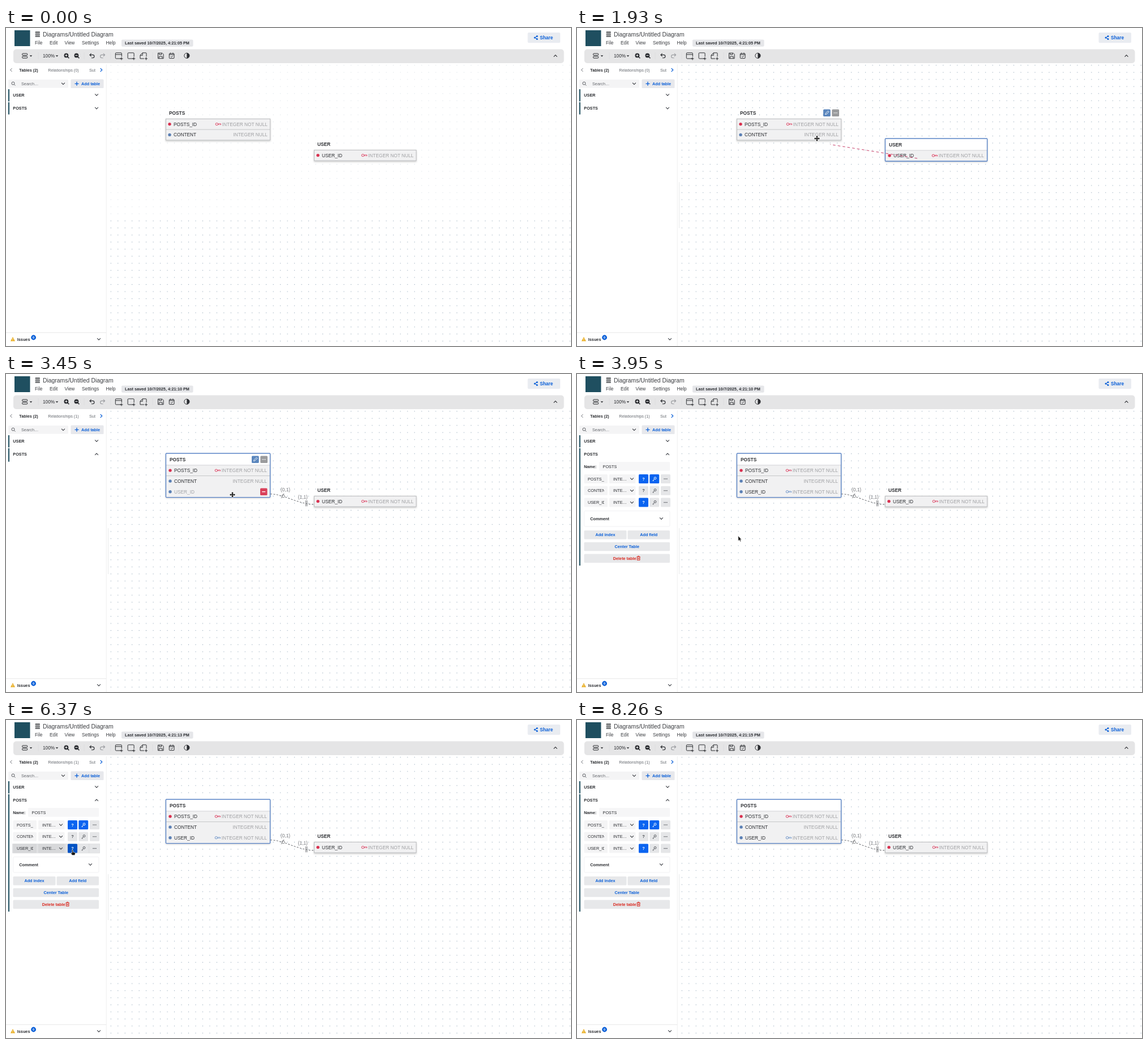
An HTML page for the animation above (9.44 s loop, 998 px wide and 561 px high).

```html
<!DOCTYPE html>
<html lang="en">
<head>
<meta charset="utf-8">
<title>Diagram editor</title>
<style>
html, body { margin: 0; width: 100%; height: 100%; overflow: hidden; background: #fff; }
svg { display: block; font-family: "Liberation Sans", Arial, sans-serif; }
text { white-space: pre; }
</style>
</head>
<body>
<svg id="stage" width="998" height="561" viewBox="0 0 998 561">
  <defs>
    <pattern id="grid" x="191.5" y="334" width="12.475" height="12.475" patternUnits="userSpaceOnUse">
      <circle cx="6.24" cy="6.24" r=".62" fill="#8fa3b5"/>
    </pattern>
    <clipPath id="nameClip"><rect x="12" y="170" width="36" height="70"/></clipPath>
    <clipPath id="tabClip"><rect x="140" y="64" width="18" height="20"/></clipPath>
    <clipPath id="panelClip"><rect id="panelBox" x="0" y="152" width="177" height="0"/></clipPath>
    <filter id="shadow" x="-10%" y="-30%" width="120%" height="180%">
      <feDropShadow dx="0" dy="1.5" stdDeviation="1.5" flood-color="#000" flood-opacity=".22"/>
    </filter>
  </defs>
  <g id="back"></g>
  <g id="live"></g>
  <g id="panel" clip-path="url(#panelClip)"></g>
  <g id="cursor"></g>
</svg>
<script>
const LOOP = 9440;
const INK = '#2b2d31', BLUE = '#0a5fd8', PINK = '#d9304f', STEEL = '#5b80b5', TEAL = '#1f4f60';
const $ = id => document.getElementById(id);

const rect = (x, y, x2, y2, fill, r = 0, more = '') =>
  `<rect x="${x}" y="${y}" width="${x2 - x}" height="${y2 - y}" rx="${r}" fill="${fill}" ${more}/>`;
const line = (d, color = INK, w = 1, more = '') =>
  `<path d="${d}" fill="none" stroke="${color}" stroke-width="${w}" ${more}/>`;
const area = (d, fill) => `<path d="${d}" fill="${fill}"/>`;
const disc = (x, y, r, fill, more = '') => `<circle cx="${x}" cy="${y}" r="${r}" fill="${fill}" ${more}/>`;
const small = 7.28, normal = 8.32;
// y is the middle of the capital letters
const text = (x, y, s, size = small, fill = INK, more = '') =>
  `<text x="${x}" y="${y + size * .36}" font-size="${size}" fill="${fill}" ${more}>${s}</text>`;
const bold = (x, y, s, size = small, fill = INK, more = '') =>
  text(x, y, s, size, fill, 'font-weight="700" ' + more);
const MID = 'text-anchor="middle"', END = 'text-anchor="end"', ROUND = 'stroke-linecap="round" stroke-linejoin="round"';
const chevron = (x, y, dir = 1, color = '#44474d') =>
  line(`M${x - 2.6} ${y - 1.3 * dir}L${x} ${y + 1.4 * dir}L${x + 2.6} ${y - 1.3 * dir}`, color, 1.1, ROUND);
const sideways = (x, y, dir, color) =>
  line(`M${x - 1.3 * dir} ${y - 2.6}L${x + 1.4 * dir} ${y}L${x - 1.3 * dir} ${y + 2.6}`, color, 1.3, ROUND);
const ellipsis = (x, y, color) => [-2.4, 0, 2.4].map(d => disc(x + d, y, .8, color)).join('');
const caret = x => area(`M${x - 2.3} 48.2h4.6l-2.3 2.6z`, INK);

function toolbar() {
  const zoom = (x, d) => disc(x - .6, 48.4, 3.9, INK) + line(`M${x + 2} 51l2.4 2.4`, INK, 1.5) + line(d, '#fff', 1);
  const plus = x => line(`M${x} 54h5M${x + 2.5} 51.5v5`, INK, 1);
  const frame = x => line(`M${x + 5.5} 54H${x - 4}q-1.2 0-1.2-1.2V45q0-1.2 1.2-1.2h8.6q1.2 0 1.2 1.2v5.5`, INK, 1);
  const turn = (x, d, c) => line(`M${x - 4 * d} 47.4h5.2a2.6 2.6 0 0 ${d > 0 ? 1 : 0} 0 5.4h-2.4`
    .replace('h5.2', `h${5.2 * d}`).replace('h-2.4', `h${-2.4 * d}`), c, 1.1) +
    line(`M${x - 1.4 * d} 44.8l${-2.7 * d} 2.6l${2.7 * d} 2.6`, c, 1.1);
  return rect(13, 37.5, 985.5, 62, '#e5e5e6', 5) +
    [57, 98, 138, 185, 259, 305].map(x => line(`M${x} 43v12`, '#dadadb', .7)).join('') +
    rect(28.7, 45, 37.7, 48.2, 'none', 1, `stroke="${INK}"`) + rect(28.7, 50, 37.7, 53.2, 'none', 1, `stroke="${INK}"`) +
    caret(44) + text(65, 49, '100%', normal) + caret(90) +
    zoom(107, 'M104.4 48.4h4M106.4 46.4v4') + zoom(125, 'M122.4 48.4h4') +
    turn(152, 1, INK) + turn(170.5, -1, '#9b9da1') +
    frame(198.5) + line('M193.4 46.8h11', INK, 1) + plus(201.5) +
    frame(220.3) + plus(223.3) +
    line('M244 54h-7v-6l4-4.2h6q1 0 1 1v5.5M237 48.2h4.2v-4.2', INK, 1) + plus(245) +
    line('M268.5 44.2h7.4l2.2 2.2v7.4h-9.6zM270.4 53.8v-3.6h5.6v3.6M270.6 44.2v2.8h4v-2.8', INK, 1) +
    rect(288.3, 45, 297, 53.6, 'none', 1, `stroke="${INK}"`) +
    line('M288.3 47h8.7M290.4 43.6v2M294.9 43.6v2M290.8 50.2l1.4 1.4 2.6-2.7', INK, 1) +
    disc(319.4, 48.8, 4.6, 'none', `stroke="${INK}" stroke-width="1"`) + area('M319.4 44.2a4.6 4.6 0 0 1 0 9.2z', INK) +
    chevron(970.5, 49, -1, INK);
}

function chrome() {
  const menu = [['File', 51], ['Edit', 77], ['View', 103.5], ['Settings', 134], ['Help', 176.5]];
  return rect(15, 4, 42.5, 32, TEAL) +
    [6.5, 10, 13.5].map(y => rect(51.5, y - .5, 60, y + 2.6, '#7c7e80', 1.2)).join('') +
    text(65, 11, 'Diagrams/Untitled Diagram', 10.4, '#3c3e42') +
    menu.map(([s, x]) => text(x, 26.5, s, normal, '#3c3e42')).join('') +
    rect(204, 20.5, 330.5, 32.7, '#e5e6e9', 2) +
    rect(921.5, 8, 979, 26.3, '#e9ecf1', 2) + bold(943, 17, 'Share', normal, BLUE) +
    line('M938 14.6L934 17l4 2.4', BLUE, 1) + disc(938, 14.4, 1.5, BLUE) + disc(934, 17, 1.5, BLUE) + disc(938, 19.6, 1.5, BLUE) +
    toolbar() +
    line('M177.2 64V561', '#ebebed', .8) +
    sideways(9, 74, -1, '#a9abaf') + bold(23.3, 74, 'Tables (2)') +
    text(147, 74, 'Subject', small, '#666a70', 'clip-path="url(#tabClip)"') + sideways(168.3, 74, 1, BLUE) +
    rect(4, 91, 110, 105.5, '#f4f4f5', 1.5) + disc(12.5, 97.6, 2.5, 'none', 'stroke="#55585e"') +
    line('M14.4 99.5l2 2', '#55585e', 1) + text(27, 98.3, 'Search…', small, '#66696f') + chevron(101, 98.3) +
    rect(114.5, 90.5, 172.5, 106, '#e7e8ec', 1.5) + line('M121.5 98.3h7M125 94.8v7', BLUE, 1.3) +
    bold(133, 98.3, 'Add table', small, BLUE) +
    rect(4, 108, 6, 129.5, TEAL) + bold(12.3, 118, 'USER') + chevron(160, 118) + bold(12.3, 141.4, 'POSTS') +
    line('M0 537.5H177', '#e2e2e4', .8) +
    area('M12 545l4 7.4h-8z', '#e9ae22') + line('M12 547.5v2.3M12 550.5v1', '#fff', .8) +
    bold(19.8, 549, 'Issues') + disc(48.6, 546, 4.4, BLUE) + bold(48.6, 546, '0', 5.6, '#fff', MID) + chevron(164, 549);
}

// ---- motion ----
const path = [
  [660, 628, 302], [1080, 551, 225], [1690, 551, 225], [1930, 424, 195], [2200, 397, 185], [2600, 394, 192],
  [2650, 394, 192], [3140, 400, 213], [3500, 400, 213], [3950, 285, 285.5], [4390, 160, 246], [4590, 160, 246],
  [4870, 137, 229], [6080, 137, 229], [6300, 117.5, 229], [6520, 117.5, 229], [6930, 347, 272], [6950, 347, 272],
  [7270, 174, 222], [7730, 117.5, 229], [8060, 117.5, 229], [8260, 708, 452]
];
function pointer(t) {
  if (t <= path[0][0]) return path[0].slice(1);
  const i = path.findIndex(p => p[0] > t);
  if (i < 0) return path[path.length - 1].slice(1);
  const [t0, x0, y0] = path[i - 1], [t1, x1, y1] = path[i], k = (t - t0) / (t1 - t0);
  return [x0 + (x1 - x0) * k, y0 + (y1 - y0) * k];
}
const inside = ([x, y], x0, y0, x1, y1) => x >= x0 && x <= x1 && y >= y0 && y <= y1;
const between = (t, a, b) => t >= a && t < b;

// ---- diagram ----
const keyMark = (x, y, c) => `<ellipse cx="${x + 2.6}" cy="${y}" rx="2.2" ry="2" fill="none" stroke="${c}"/>` +
  line(`M${x + 4.8} ${y - .7}h5v1.7h-1.4M${x + 4.8} ${y + .7}h2.6`, c, .9);

function table({ x, x2, y, name, fields, selected, hover, hoverRow }) {
  const o = selected ? 1 : 0, pitch = 18.8, top = y + 20.5 + o * .5, bottom = top + pitch * fields.length;
  let s = selected ? rect(x, y, x2, bottom + .4, '#fff', 1, 'filter="url(#shadow)"') : '';
  s += rect(x + .3, top, x2 - .3, bottom, '#f1f1f2', 0, selected ? '' : 'filter="url(#shadow)" stroke="#b3b4b6" stroke-width=".9"');
  if (selected) s += line(`M${x} ${top}H${x2}`, '#c9cacd', .8);
  s += bold(x + 6 + o, y + 10.3 + o, name, normal, '#303236');
  const keys = fields.filter(f => f.pk).length;
  if (keys < fields.length) s += line(`M${x} ${top + pitch * keys}H${x2}`, '#b9babd', .8);
  fields.forEach((f, i) => {
    const cy = top + pitch * (i + .5) - .1, off = hoverRow === i, right = x2 - 5 - o;
    s += disc(x + 7 + o, cy, 2.7, f.pk ? PINK : STEEL);
    s += text(x + 14 + o, cy, f.name, normal, off ? '#a2a4a8' : INK);
    if (off) {
      s += rect(x2 - 18, cy - 6.3, x2 - 5.5, cy + 6.2, '#d9405a', 1.5) + line(`M${x2 - 14.8} ${cy}h6`, '#fff', 1.3);
      return;
    }
    s += text(right, cy, f.nn ? 'INTEGER NOT NULL' : 'INTEGER NULL', normal, '#a0a1a4', END);
    let kx = right - (f.nn ? 92.3 : 73);
    if (f.fk) { s += keyMark(kx, cy, '#6d94c9'); kx -= 12.4; }
    if (f.pk) s += keyMark(kx, cy, '#dd4262');
  });
  if (hover) {
    const bx = x2 - 32 - o, by = y + 3.6 + o;
    s += rect(bx, by, bx + 12.7, by + 12.7, '#5a86bd', 1.5) + line(`M${bx + 3.6} ${by + 9.2}l.6-2.2 4.2-4.2 1.6 1.6-4.2 4.2z`, '#fff', .9) +
      rect(bx + 15.3, by, bx + 28, by + 12.7, '#9a9b9d', 1.5) + ellipsis(bx + 21.6, by + 6.4, '#fff');
  }
  if (selected) s += rect(x + .4, y + .2, x2 - .4, bottom + .4, 'none', 1, 'stroke="#5b85c8" stroke-width="1.4"');
  return s;
}

function relation(pk, nn) {
  const y = pk ? 193.7 : 211.7, c = '#74767a', my = pk ? 199.5 : 215.2, mx = pk ? 487.5 : 489;
  return line(`M467 ${y}C${pk ? '492' : '490'} ${y} 517 230 544 230`, c, 1.1, pk ? '' : 'stroke-dasharray="3 2.4"') +
    disc(mx + .7, my + .2, 2.5, '#fff', `stroke="${c}" stroke-width=".9"`) + line(`M${mx - 3} ${my + 4}l5-8.5`, c, .9) +
    (nn ? line('M529.6 223v10.4M531.8 223v10.4', c, 1)
        : line('M539 224.6l2.2 3.6-2.2 3.6-2.2-3.6z', c, 1, 'fill-opacity="0"')) +
    text(485, pk ? 187.5 : 204, '(0,1)', normal, c) + text(515.8, pk ? 215.5 : 217, nn ? '(1,1)' : '(0,1)', normal, c);
}

// ---- field editor ----
function panel(pk, nn, p) {
  const over = inside(p, 11, 218, 166, 236);
  const rows = [['POSTS_ID', 1, 1], ['CONTENT', 0, 0], ['USER_ID', nn, pk]];
  const button = (x, y, x2, s, c) => rect(x, y, x2, y + 15.5, '#e7e8ea', 1.5) + bold((x + x2) / 2, y + 7.8, s, small, c, MID);
  let s = bold(12.3, 163, 'Name:') + rect(39, 155, 164, 170.7, '#f6f6f7', 1.5) + text(45.6, 163, 'POSTS');
  rows.forEach(([name, on, key], i) => {
    const y = 185 + i * 20.8, hot = over && i === 2;
    if (hot) s += rect(11, y - 8.6, 166, y + 8.6, '#e0e1e3', 1);
    const field = 'fill-opacity=".05"';
    s += rect(12.5, y - 8, 54, y + 8, '#2e3238', 1.5, field) + rect(57, y - 8, 103.5, y + 8, '#2e3238', 1.5, field) +
      `<g clip-path="url(#nameClip)">${text(19, y, name)}</g>` + text(64, y, 'INTE…') + chevron(97, y);
    const fill = (v, x) => !v ? '#e5e6e8' : hot && Math.abs(p[0] - x) < 9 ? '#0052c4' : '#0a64f0';
    s += rect(109, y - 8, 126, y + 8, fill(on, 117.5), 1.5) + bold(117.5, y, '?', small, on ? '#fff' : '#44474d', MID);
    const c = key ? '#fff' : '#55585e';
    s += rect(128.3, y - 8, 145.2, y + 8, fill(key, 136.7), 1.5) + disc(138, y - 1.2, 1.9, 'none', `stroke="${c}"`) +
      line(`M136.6 ${y + .3}l-2.8 2.9h1.8`, c, 1);
    s += rect(148, y - 8, 165, y + 8, '#e5e6e8', 1.5) + ellipsis(156.5, y, '#44474d');
  });
  s += rect(12.7, 241.5, 164, 269, '#fff', 2, 'stroke="#eeeef0" stroke-width=".8"') + bold(23.3, 255, 'Comment') + chevron(149, 255) +
    button(12.5, 276, 87.5, 'Add index', BLUE) + button(89.5, 276, 164, 'Add field', BLUE) +
    button(12.5, 296.8, 164, 'Center Table', BLUE) + button(12.5, 317.5, 164, '', BLUE) +
    bold(63.8, 325.3, 'Delete table', small, '#d9281f') +
    line('M105.4 322.6h6.4M107.4 322.4v-1.2h2.4v1.2M106.2 322.8v5.6h4.8v-5.6M107.8 324.2v2.8M109.4 324.2v2.8', '#d9281f', .9);
  return s;
}

const shapes = {
  arrow: '<path d="M0 0V9.2L2.1 7.3L3.6 10.3L5 9.6L3.6 6.8H6Z" fill="#111" stroke="#fff" stroke-width=".6"/>',
  hand: '<path d="M-.9 .6Q0-.6 .9 .6V4L4.2 4.8Q5 5.2 4.8 6.4L4.2 9.4H-.6L-3 6.2Q-3 5-1.8 5.4L-.9 6Z" fill="#111" stroke="#fff" stroke-width=".6"/>',
  move: '<path d="M0-5L2-2.6H.8V-.8H2.6V-2L5 0L2.6 2V.8H.8V2.6H2L0 5L-2 2.6H-.8V.8H-2.6V2L-5 0L-2.6-2V-.8H-.8V-2.6H-2Z" fill="#111" stroke="#fff" stroke-width="1.2" paint-order="stroke"/>'
};

const last = {};
function put(id, html) {
  if (last[id] !== html) $(id).innerHTML = last[id] = html;
}

function draw(t) {
  const p = pointer(t), shown = between(t, 660, 8260);
  const linked = t >= 2600, pk = between(t, 5100, 6010), nn = !between(t, 6480, 7930);
  const drag = between(t, 1690, 2600), open = t >= 3450;
  const postSel = t >= 3140, userSel = between(t, 1510, 2660);
  const post = { name: 'POSTS_ID', pk: 1, nn: 1 }, content = { name: 'CONTENT' };
  const ref = { name: 'USER_ID', pk, nn, fk: 1 };
  const fields = !linked ? [post, content] : pk ? [post, ref, content] : [post, content, ref];
  const overPost = shown && t < 8000 && inside(p, 282, 140, 467, linked ? 217 : 198);
  const overUser = shown && t < 8000 && !drag && inside(p, 544, 195, 725, 236);
  const row = (over, top, n) => {
    const i = Math.floor((p[1] - top) / 18.8);
    return over && !drag && i >= 0 && i < n ? i : -1;
  };
  const stamp = t < 2600 ? '05' : t < 5100 ? '10' : t < 7930 ? '13' : '15';
  const fade = .35 + .65 * Math.min(1, Math.max(0, (t - 20) / 470));
  const grow = open ? 1 - Math.pow(1 - Math.min(1, (t - 3450) / 250), 3) : 0;
  const resize = t < 8000 && between(p[0], 172, 190) && t > 3500;

  let s = rect(184, 64, 998, 338, 'url(#grid)', 0, `opacity="${fade.toFixed(2)}"`) + rect(184, 338, 998, 561, 'url(#grid)');
  s += resize ? rect(177.5, 64, 183.8, 561, '#d0d1d4') : line('M180.5 272V353', '#e3e4e6', .8, `opacity="${t < 20 ? 0 : 1}"`);
  s += bold(210, 26.6, `Last saved 10/7/2025, 4:21:${stamp} PM`) +
    text(74.2, 74, `Relationships (${linked ? 1 : 0})`, small, '#666a70');
  s += rect(4, 131, 6, 152.5 + grow * 185.5, TEAL) + chevron(160, 141.4, open ? -1 : 1);
  if (linked) s += relation(pk, nn);
  s += table({ x: 282, x2: 467, y: 139.8, name: 'POSTS', fields, selected: postSel, hover: overPost,
    hoverRow: row(overPost, 160.5, fields.length) });
  s += table({ x: 544, x2: 725, y: 194.8, name: 'USER', fields: [{ name: 'USER_ID', pk: 1, nn: 1 }],
    selected: userSel, hover: overUser, hoverRow: row(overUser, 215.5, 1) });
  if (drag) {
    const [lx, ly] = pointer(t - 45);
    s += line(`M601 230L${lx.toFixed(1)} ${(ly + 5).toFixed(1)}`, '#c8436c', 1, 'stroke-dasharray="4.6 4"');
  }
  put('live', s);

  $('panelBox').setAttribute('height', grow * 186);
  put('panel', open ? panel(pk, nn, p) : '');

  const onButton = inside(p, 109, 218, 165, 236) || (!drag && inside(p, 547, 221, 555, 229));
  const kind = onButton ? 'hand' : drag || overPost || overUser ? 'move' : 'arrow';
  put('cursor', shown ? shapes[kind] : '');
  $('cursor').setAttribute('transform', `translate(${p[0].toFixed(2)} ${p[1].toFixed(2)})`);
}

put('back', chrome());
draw(0);
const start = performance.now();
function tick() {
  draw((performance.now() - start) % LOOP);
  requestAnimationFrame(tick);
}
requestAnimationFrame(tick);
</script>
</body>
</html>
```
